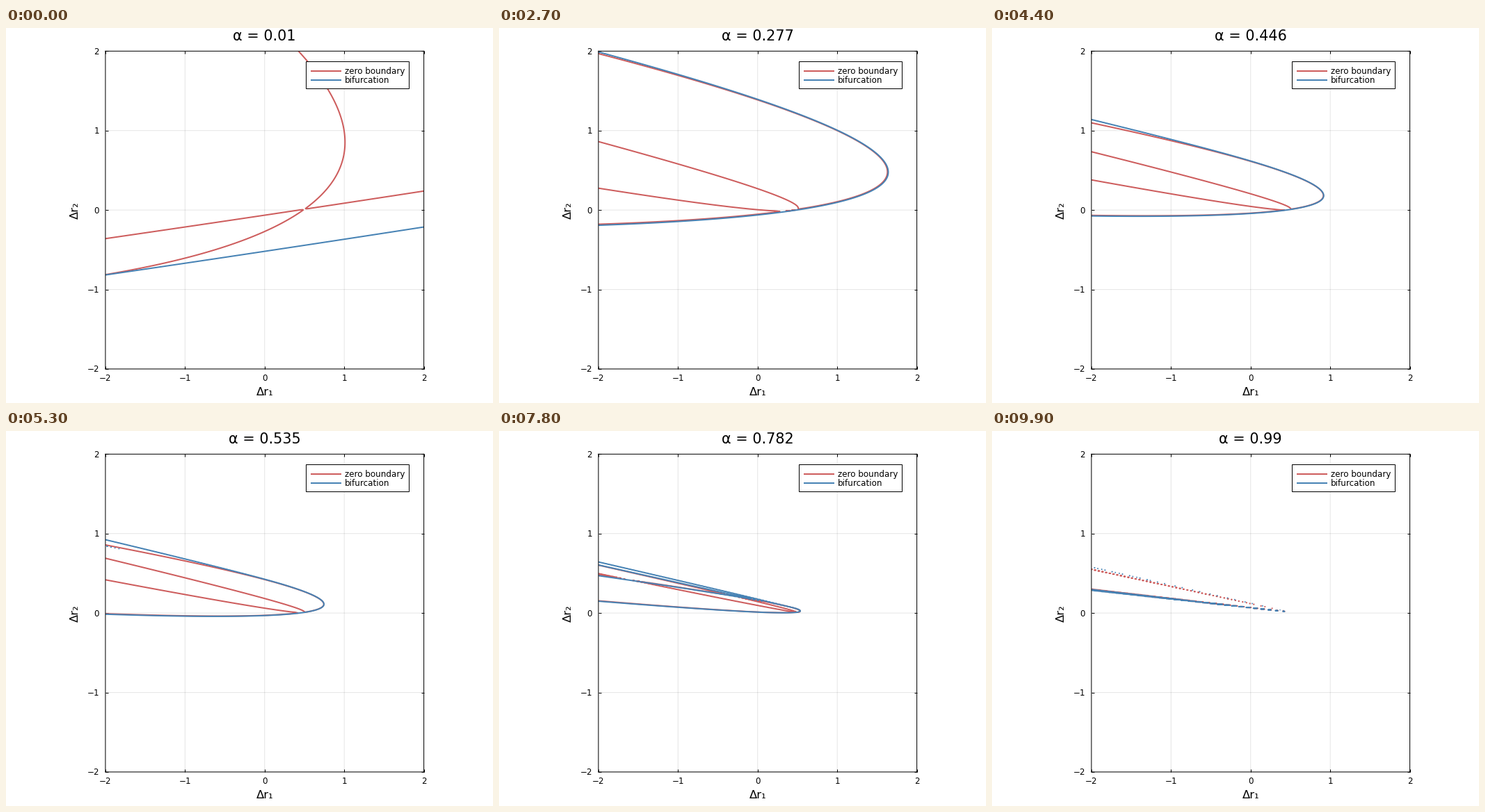
A matplotlib script for the animation above (10 s loop, 700 by 540 pixels).

```python
import numpy as np
import matplotlib.pyplot as plt
from matplotlib.animation import FuncAnimation
from matplotlib.patches import Rectangle

plt.rcParams["font.family"] = "DejaVu Sans"

W, H, DPI, FRAMES = 700, 540, 100, 100
LEFT, TOP, SIDE = 142.9, 33.3, 457.7
RED, BLUE = "#cd5c5c", "#4682b4"
PX = 72 / DPI  # points per pixel

# A quadratic map of two abundances (x, y). Each axis maps to a parabola
# through ORIGIN: tip offset P, slope N at the origin, axis slope A.
ORIGIN = (0.5, 0.0105)
P = (0.0052, 0.600)
N = (0.719, 0.1508)
A = (-0.2158, -0.1142)
CROSS = np.array([0.021, 0.00074])  # xy term, linear in the slope m

grid = np.linspace(-2, 2, 401)
R1, R2 = np.meshgrid(grid, grid)

# Tangents of the fold curve, v = m u - num(m) / den(m)
d1, d2 = (p * np.array([1, -a]) for p, a in zip(P, A))
v1, v2 = (p * np.array([1, -n]) for p, n in zip(P, N))
mul = np.polymul
den = mul(d1, d2) - mul(CROSS, CROSS) / 4
num = mul(d2, mul(v1, v1)) - mul(CROSS, mul(v1, v2)) + mul(d1, mul(v2, v2))


def parabola(u, v, p, n, a):
    """Zero where the abundance on the other axis vanishes."""
    b = p * (n - a) ** 2
    return (v - a * u - 2 * p * (n - a)) ** 2 - 4 * b * (p - u)


def fold(u, v):
    """Discriminant of the cubic giving the tangent slopes through (u, v)."""
    a = num[0] - u * den[0]
    b = num[1] + v * den[0] - u * den[1]
    c = num[2] + v * den[1] - u * den[2]
    d = num[3] + v * den[2]
    return (18 * a * b * c * d - 4 * b**3 * d + b**2 * c**2
            - 4 * a * c**3 - 27 * a**2 * d**2)


fig = plt.figure(figsize=(W / DPI, H / DPI), dpi=DPI, facecolor="white")

ax = fig.add_axes([LEFT / W, 1 - (TOP + SIDE) / H, SIDE / W, SIDE / H])
ax.set(xlim=(-2, 2), ylim=(-2, 2))
ax.set_xticks(range(-2, 3))
ax.set_yticks(range(-2, 3))
ax.tick_params(direction="in", length=4 * PX, width=PX, top=True, right=True,
               labelbottom=False, labelleft=False)
ax.grid(color="black", alpha=0.1, lw=PX)
ax.set_axisbelow(True)
for spine in ax.spines.values():
    spine.set_linewidth(PX)
for line in [*ax.spines.values(), *ax.get_xgridlines(), *ax.get_ygridlines()]:
    line.set_snap(False)

# Overlay in pixel coordinates for text and legend
over = fig.add_axes([0, 0, 1, 1], facecolor="none")
over.set(xlim=(0, W), ylim=(H, 0))
over.axis("off")


def label(x, y, text, px, **kw):
    kw = {"ha": "center", "va": "baseline", **kw}
    return over.text(x, y, text, fontsize=px * PX, color="black", **kw)


for k in range(-2, 3):
    name = str(k).replace("-", "\u2212")
    pos = (k + 2) * SIDE / 4
    label(LEFT + pos, 508, name, 11.9)
    label(134, TOP + SIDE - pos + 4.4, name, 11.9, ha="right")

mid = SIDE / 2
label(LEFT + mid, 528.8, "Δr₁", 16.4)
label(103.5, TOP + mid, "Δr₂", 16.4, rotation=90, rotation_mode="anchor")
title = label(LEFT + mid, 18.5, "", 20.8)

over.add_patch(Rectangle((431.5, 48.5), 148, 39, fc="white", ec="black",
                         lw=PX, snap=False))
for y, color, name in ((62, RED, "zero boundary"), (75, BLUE, "bifurcation")):
    over.plot([438, 482], [y, y], color=color, lw=2 * PX,
              solid_capstyle="butt", snap=False)
    label(487, y + 4, name, 11.9, ha="left")

curves = []


def update(i):
    while curves:
        curves.pop().remove()
    alpha = 0.01 + 0.98 * i / (FRAMES - 1)
    scale = (1 - alpha) ** 2 / alpha
    u, v = (R1 - ORIGIN[0]) / scale, (R2 - ORIGIN[1]) / scale
    zero = parabola(u, v, P[0], N[0], A[0]) * parabola(u, v, P[1], N[1], A[1])
    for z, color in ((zero, RED), (fold(u, v), BLUE)):
        z = z / np.abs(z).max()
        curves.append(ax.contour(grid, grid, z, levels=[0], colors=color,
                                 linewidths=2 * PX, linestyles="solid", zorder=2))
    title.set_text(f"α = {round(alpha, 3)}")
    return []


anim = FuncAnimation(fig, update, frames=FRAMES, init_func=lambda: [],
                     interval=100, repeat=True, repeat_delay=0, blit=False)
plt.show()
```
